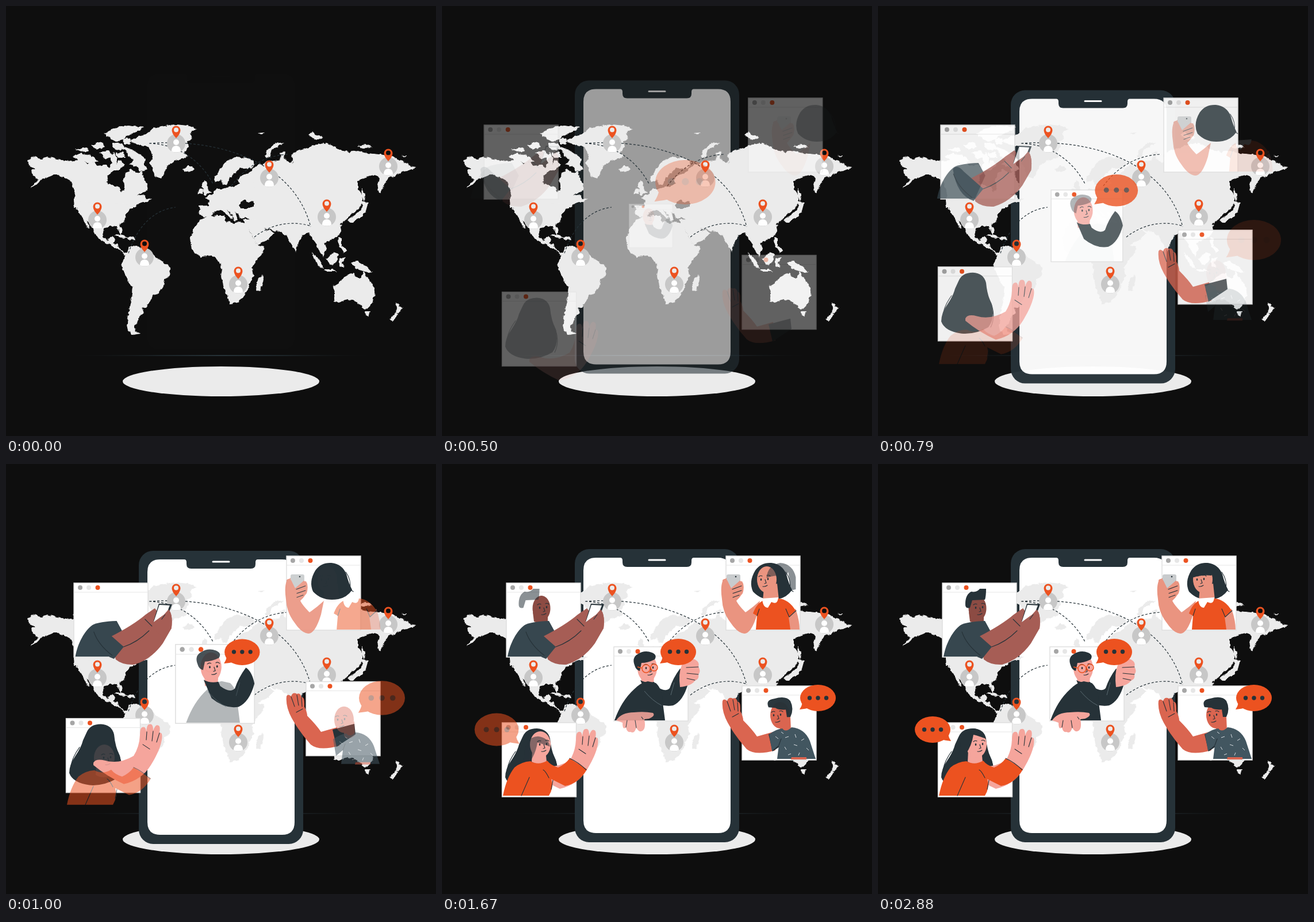
An HTML page that plays this animation: 748 by 748 pixels, repeating every 2.93 s.

```html
<!DOCTYPE html>
<html lang="en">
<head>
<meta charset="utf-8">
<title>Connected world</title>
<style>
html, body { margin: 0; width: 100%; height: 100%; overflow: hidden; background: #0e0e0e; }
svg { display: block; width: 100vw; height: 100vh; }
.white { fill: #fff; } .dark { fill: #263238; } .slate { fill: #37474f; } .accent { fill: #ec5220; }
.brown { fill: #a65d55; } .umber { fill: #8c4b43; } .peach { fill: #ea9480; } .pink { fill: #f5a59c; } .rust { fill: #da6550; }
.land { fill: #ebebeb; }
.ink { fill: none; stroke: #263238; stroke-width: 1.1; stroke-linecap: round; }
.dash { stroke-dasharray: 4 3; stroke-width: 1.2; stroke-linecap: butt; }
</style>
</head>
<body>
<svg viewBox="0 0 748 748">
<defs>
  <linearGradient id="taper">
    <stop offset="0" stop-color="#263238" stop-opacity="0"/>
    <stop offset=".3" stop-color="#263238"/>
    <stop offset=".7" stop-color="#263238"/>
    <stop offset="1" stop-color="#263238" stop-opacity="0"/>
  </linearGradient>
  <filter id="coast" x="0" y="0" width="748" height="748" filterUnits="userSpaceOnUse" color-interpolation-filters="sRGB">
    <feTurbulence type="fractalNoise" baseFrequency=".14" numOctaves="2" seed="4"/>
    <feDisplacementMap in="SourceGraphic" scale="6" xChannelSelector="R" yChannelSelector="G"/>
  </filter>
  <g id="pin">
    <circle r="16" fill="#c7c7c7"/>
    <circle class="white" cy="-2" r="5"/>
    <path class="white" d="M-8 14Q-8 4 0 4T8 14Q0 17-8 14Z"/>
    <path class="accent" fill-rule="evenodd" d="M0-9Q-7.5-17-7.5-23A7.5 7.5 0 0 1 7.5-23Q7.5-17 0-9ZM-4-23.500a4 4 0 0 0 8 0a4 4 0 0 0-8 0Z"/>
  </g>
  <g id="frame">
    <rect width="129" height="129" class="white" stroke="#dedede" stroke-width="1.4"/>
    <path d="M0 16H129" stroke="#e6e6e6"/>
    <circle cx="11" cy="8" r="4" fill="#a6a6a6"/>
    <circle cx="26" cy="8" r="4" fill="#e6e6e6"/>
    <circle cx="41.500" cy="8" r="4" class="accent"/>
  </g>
  <g id="face">
    <ellipse class="dark" cx="-6" rx="1.300" ry="2"/>
    <ellipse class="dark" cx="6" cy="-1" rx="1.300" ry="2"/>
    <path class="ink" d="M-10-5Q-7-8-4-6M4-7Q7-9 10-6M1 0L3 6L0 7M-3 12Q1 13 5 10"/>
  </g>
  <g id="dots" class="dark">
    <circle cx="-14.500" r="3.700"/><circle r="3.700"/><circle cx="14.500" r="3.700"/>
  </g>
  <g id="bubble" class="accent">
    <ellipse rx="31" ry="23"/>
    <path d="M-27 8Q-28 14-32 20Q-22 19-14 17Z"/>
  </g>
</defs>

<rect width="748" height="748" fill="#0e0e0e"/>
<path d="M95 608L374 607L652 608L374 609Z" fill="url(#taper)"/>
<ellipse class="land" cx="374" cy="653" rx="171" ry="26"/>

<g data-in="-47 1295 0 -45">
  <rect class="dark" x="231" y="148" width="286" height="510" rx="25"/>
  <path class="white" d="M268 163H310Q314 163 314 168V171Q314 179 322 179H426Q434 179 434 171V168Q434 163 438 163H480Q502 163 502 185V620Q502 642 480 642H268Q246 642 246 620V185Q246 163 268 163Z"/>
  <path d="M360 167H388" stroke="#fff" stroke-width="3" stroke-linecap="round"/>
</g>

<g class="land" filter="url(#coast)">
  <path d="M37 270L46 262 60 266 72 262 88 266 105 268 118 270 130 268 140 274 152 272 160 278 172 276 180 282 184 272 180 262 188 256 194 264 192 274 200 268 207 276 198 284 186 288 178 296 174 306 184 312 196 314 200 324 206 318 204 304 208 290 218 284 226 290 236 288 240 300 246 310 248 320 238 324 228 330 240 328 244 336 254 334 246 340 232 342 224 350 118 350 120 320 114 306 100 298 88 292 74 298 62 302 54 310 42 316 56 302 46 294 44 286 50 282 40 278Z"/>
  <path d="M118 340L230 345 214 356 208 364 206 374 198 380 202 392 200 398 192 384 180 382 170 388 168 400 176 408 186 400 190 406 186 412 194 414 198 424 206 430 212 428 208 434 198 426 186 418 174 412 160 404 154 394 144 376 140 372 146 388 140 384 132 366 122 352Z"/>
  <path d="M170 222L188 212 212 208 240 211 228 218 214 224 204 232 192 236 182 230ZM204 244L220 250 232 258 242 266 240 276 246 284 234 288 228 280 214 276 222 268 212 260ZM118 262L130 256 152 262 160 270 146 274 126 270ZM120 250L138 246 146 252 130 254ZM148 242L166 237 172 245 158 250ZM163 254L180 252 186 262 172 266ZM184 240L202 238 208 248 192 252ZM204 232L216 230 218 240 206 241ZM190 256L204 254 208 264 196 264Z"/>
  <path d="M215 235L232 226 246 222 256 212 276 208 296 206 316 208 330 214 320 222 324 228 316 236 318 246 310 254 316 262 304 266 292 270 282 278 276 288 270 300 260 296 254 284 250 272 256 264 252 252 246 244 232 242ZM307 283L314 279 324 279 328 284 318 290 310 288Z"/>
  <path d="M188 398L200 397 212 403 206 405ZM211 403L222 402 224 406 214 407Z"/>
  <path d="M200 452L204 440 210 430 214 418 222 416 232 420 246 422 254 430 262 438 272 444 287 456 284 468 276 476 274 488 266 500 254 504 250 516 242 526 236 524 240 534 232 540 230 548 224 556 226 564 232 570 222 572 212 566 211 550 214 530 218 508 220 488 210 474Z"/>
  <path d="M320 404L328 384 338 372 352 366 368 364 380 364 382 374 396 378 404 376 418 378 424 390 430 404 438 416 450 418 446 430 434 444 428 456 430 470 424 482 420 496 412 506 402 516 390 518 384 504 378 486 374 470 376 458 370 444 358 434 340 436 328 430 322 418ZM436 480L446 467 448 476 442 494 435 496Z"/>
  <path d="M362 300L372 284 384 270 400 262 418 264 432 270 430 282 416 284 406 280 400 290 390 298 384 310 378 312 374 303 364 307ZM344 324L340 314 344 304 351 308 350 316 357 324 345 329ZM333 325L338 317 343 321 341 327Z"/>
  <path fill-rule="evenodd" d="M337 362L336 348 352 347 353 338 346 333 358 328 366 318 376 318 394 314 406 310 402 302 412 294 430 286 440 274 470 290 470 392 440 385 426 374 418 368 408 370 404 362 398 358 404 372 398 374 390 362 384 355 394 364 392 371 380 358 372 354 362 358 356 366 346 368ZM406 346L414 337 422 342 430 338 432 348 422 352 408 352Z"/>
  <path d="M428 284L444 278 452 270 460 268 472 270 478 266 476 256 486 254 484 264 494 274 500 270 496 258 508 252 522 248 540 240 552 238 566 242 580 250 596 254 612 252 628 256 650 258 672 262 690 270 700 276 712 281 704 286 690 288 680 294 664 300 658 312 650 326 646 316 650 300 642 294 626 298 612 306 612 318 620 330 620 342 610 356 598 364 590 374 582 380 584 390 576 402 562 408 554 412 558 422 552 436 544 424 538 412 530 402 526 394 516 398 508 412 504 428 496 414 488 400 476 392 460 390 440 380Z"/>
  <path d="M412 371L440 372 450 388 466 394 458 406 438 416 432 408 424 390ZM450 262L456 248 468 240 484 238 474 244 462 250 458 264ZM438 221L450 220 444 224ZM526 224L534 218 538 224 552 228 540 233ZM612 243L626 241 638 245 620 248ZM689 261L697 260 696 263Z"/>
  <path d="M532 429L544 440 553 457 545 453 536 441ZM552 458L566 458 575 462 556 462ZM558 440L570 428 578 432 574 447 563 450ZM580 440L591 438 585 447 589 456 580 453ZM577 403L584 404 584 416 592 424 588 430 580 418ZM600 446L612 444 626 452 637 464 624 462 608 457ZM594 372L608 363 617 355 621 346 617 339 630 342 625 360 613 370 602 377ZM618 317L624 327 623 341 619 331Z"/>
  <path d="M568 488L578 482 588 474 596 466 604 464 608 472 616 474 622 462 628 472 640 488 642 504 636 518 626 528 618 522 608 514 594 510 578 516 570 514 572 500ZM625 531L633 531 630 539 626 537ZM678 516L690 526 683 534 680 532ZM666 545L680 532 683 537 672 547Z"/>
</g>

<path class="ink dash" d="M249 239C370 230 500 270 530 384M249 239C300 240 340 270 361 311M392 313Q430 262 490 258M432 402C460 380 495 372 531 383M213 430C228 385 255 355 295 350"/>
<g id="pins"></g>

<!-- upper left caller -->
<g data-in="-47 1295 -94 0"><g data-in="-47 1295">
  <use href="#frame" x="112" y="207"/>
  <g data-in="1000 650">
    <path class="umber" d="M158 258L184 260 184 274Q174 280 160 274Z"/>
    <ellipse class="umber" cx="173" cy="251" rx="15.500" ry="22"/>
    <use href="#face" x="176" y="250"/>
  </g>
  <path class="dark" data-in="1270 1000 -40 0" d="M152 246Q151 228 162 222Q172 224 177 217L188 217Q188 230 186 236L164 237 160 250Q153 252 152 246Z"/>
  <path class="slate" data-in="300 1000 -30 0" d="M114 335C118 312 130 290 144 280Q156 274 186 273L198 295 180 335Z"/>
  <g data-in="100 1295 -60 0">
    <path class="brown" d="M176 300Q215 280 236 262L252 251Q260 260 264 270L281 286Q284 262 276 253L281 286 266 312Q246 340 216 349Q196 350 184 340Z"/>
    <path class="slate" d="M145 284Q152 274 164 288L198 318 181 339Q152 330 145 284Z"/>
    <path class="dark" d="M259 243L282 244 268 283 248 280Z"/>
    <path class="white" d="M260 245L278 246 265 280 249 278Z"/>
    <path class="brown" d="M245 285Q232 280 233 272Q242 266 248 264L250 275 268 262 276 253Q284 262 281 286L266 300Z"/>
    <path class="ink" d="M146 292Q154 315 178 333M198 318Q222 310 242 290M235 270L247 282M264 270L270 262"/>
  </g>
</g></g>

<!-- upper right caller -->
<g data-in="-47 1295 94 0"><g data-in="-47 1295">
  <use href="#frame" x="494" y="160"/>
  <g data-in="100 1295 60 0">
    <path class="dark" d="M541 222Q533 205 545 185Q555 171 573 172Q592 174 599 192Q603 208 609 219Q600 232 585 235Q558 240 541 222Z"/>
    <path class="ink" d="M598 188Q608 202 605 218L611 222"/>
  </g>
  <g data-in="950 700">
    <path class="peach" d="M560 215L583 208 586 236Q572 248 558 238Z"/>
    <ellipse class="peach" cx="565" cy="201" rx="17" ry="23"/>
    <use href="#face" x="561" y="201"/>
  </g>
  <path class="dark" data-in="1270 1000 40 0" d="M546 198Q548 176 570 172Q592 174 597 197L597 218 588 220 584 188 580 194Q564 192 546 198Z"/>
  <g data-in="200 1350 60 0">
    <path class="peach" d="M488 204Q484 215 487 235Q488 258 502 276Q514 294 526 295Q538 295 548 262L553 238Q540 250 528 258Q516 246 512 238L523 225Q527 212 522 204L500 212 495 198Z"/>
    <rect x="495" y="192" width="24" height="30" rx="3" fill="#c8cbcd"/>
    <circle class="dark" cx="511" cy="196" r="1.300"/>
    <path class="peach" d="M488 202Q494 196 498 206L503 216 518 203Q526 206 523 213Q526 220 521 226Q516 238 505 240L488 226Z"/>
    <path class="ink" d="M505 218L521 212M506 225L521 220M506 232L517 228"/>
  </g>
  <g data-in="600 1050 70 0">
    <path class="peach" d="M600 262L615 252Q622 272 622 288L601 288Z"/>
    <path class="accent" d="M546 288L548 264 541 260Q548 240 563 236L586 234Q604 236 615 255L603 266 606 288Z"/>
    <path class="white" d="M557 234Q558 250 567 250L573 240Q584 246 585 232Z"/>
    <path class="ink" d="M598 252L604 266 616 255M548 264L552 252"/>
  </g>
</g></g>

<!-- lower left caller -->
<g data-in="-47 1295 0 115"><g data-in="-47 1295">
  <use href="#frame" x="104.500" y="450"/>
  <g data-in="100 1295">
    <path class="dark" d="M140 475Q146 460 165 460Q184 461 188 478Q190 500 198 515Q204 540 192 555Q170 568 145 566Q116 562 110 545Q110 530 121 515Q131 500 134 488Z"/>
    <path class="ink" d="M128 500Q106 530 116 552M190 500Q208 530 196 555"/>
  </g>
  <g data-in="100 1295 0 60">
    <path class="pink" d="M152 528Q156 520 172 524Q196 531 222 516Q232 500 233 480Q233 466 238 466Q243 464 244 474Q245 460 250 461Q256 459 256 472Q260 460 265 463Q269 464 267 476Q273 474 271 488Q268 506 252 532Q236 558 205 565Q176 552 152 532Z"/>
    <path class="ink" d="M245 474L244 488M256 473L254 490M267 476L262 492M238 496L250 504"/>
  </g>
  <g data-in="850 800 0 35">
    <path class="pink" d="M157 498L180 498 182 518Q170 526 156 518Z"/>
    <ellipse class="pink" cx="171" cy="488" rx="18" ry="23"/>
    <use href="#face" x="176" y="488"/>
  </g>
  <path class="dark" data-in="1270 1000 0 30" d="M143 494Q144 461 167 460Q185 462 188 478Q172 472 166 471Q163 490 153 504L155 516 134 530Z"/>
  <g data-in="560 1100 0 50">
    <path class="accent" d="M106 577Q112 546 126 528Q138 518 154 517Q168 525 183 516Q189 524 202 528Q215 522 222 512L252 531Q238 556 214 560L190 548Q195 562 186 577Z"/>
    <path class="ink" d="M138 577L152 545M186 546Q180 534 176 532M193 550L190 566M222 512Q236 518 251 532"/>
  </g>
</g></g>

<!-- lower right caller -->
<g data-in="-47 1295 0 115"><g data-in="-47 1295">
  <use href="#frame" x="522" y="386"/>
  <g data-in="100 1295 0 55">
    <path class="rust" d="M488 412Q490 407 496 412Q499 404 506 408Q512 405 514 414Q520 412 519 430Q524 440 524 446Q540 462 548 474L576 466 580 498Q545 508 530 496Q510 474 497 450Q486 430 488 412Z"/>
    <path class="ink" d="M496 413L502 430M506 410L509 428M514 415L515 430M505 440L516 434"/>
    <path class="dark" d="M568 470L606 460 608 478 575 500Z"/>
  </g>
  <g data-in="700 900 0 25">
    <path class="rust" d="M588 448L606 440 607 464Q596 474 588 466Z"/>
    <ellipse class="rust" cx="588" cy="437" rx="17" ry="23"/>
    <use href="#face" x="583" y="437"/>
  </g>
  <path class="dark" data-in="1150 800 0 8" d="M568 423Q562 410 578 408Q598 402 606 412Q613 426 606 440L600 440 598 427Q586 428 580 424Z"/>
  <g data-in="560 1100 0 35">
    <path fill="#425660" d="M569 470Q582 461 592 460Q598 468 608 458Q631 460 640 482L650 513 583 513 586 489 574 499Z"/>
    <path d="M580 474l5 4M597 476l6-2M614 470l2 6M630 478l-5 3M596 492l3 5M612 488l6 2M634 494l4 4M602 506l5-2M622 502l-2 5M590 466l4 3" stroke="#d5dade" fill="none"/>
    <path class="ink" d="M586 489L590 478"/>
    <path class="rust" d="M608 510H634V514H607Z"/>
  </g>
</g></g>

<!-- middle caller -->
<g data-in="-47 1295 0 0 0 363 382"><g data-in="-47 1295">
  <use href="#frame" x="299" y="318"/>
  <g data-in="100 1295">
    <path class="pink" d="M346 365L369 366 368 385 347 386Z"/>
    <ellipse class="pink" cx="357" cy="355" rx="17" ry="24"/>
    <use href="#face" x="361" y="355"/>
    <path class="dark" d="M345 376Q356 382 369 379L372 386Q388 398 396 390Q402 372 414 356Q424 362 428 382Q420 412 402 420Q380 424 358 406Z"/>
  </g>
  <path class="dark" data-in="500 900" d="M335 350Q330 337 340 331Q352 323 365 328Q375 332 370 340Q358 346 347 346L344 360Q337 358 335 350Z"/>
  <path class="dark" data-in="720 900 25 0" d="M300 446Q312 412 334 392Q346 380 358 378L372 381Q384 392 384 415L388 446Z"/>
  <path data-in="560 1100" d="M352 395Q366 412 382 420M404 380L398 402" fill="none" stroke="#596970"/>
  <g data-in="900 750" fill="none" stroke="#ec5220" stroke-width="1.500">
    <circle cx="355" cy="356" r="7"/><circle cx="369" cy="354" r="6"/><path d="M340 353L348 355"/>
  </g>
  <g data-in="1050 900">
    <path class="pink" d="M414 388Q411 364 417 350Q428 336 440 340Q449 345 446 353Q451 360 446 366Q448 374 440 377Q434 386 414 388Z"/>
    <path class="ink" d="M425 354L446 353M426 364L446 366M426 373L440 376"/>
  </g>
  <g data-in="1150 900">
    <path class="pink" d="M303 446Q312 432 334 432Q352 430 367 433Q372 438 360 443L352 444Q355 460 349 464Q342 468 338 458Q335 470 328 466Q322 468 320 458Q314 464 314 450Z"/>
    <path class="ink" d="M320 458L322 446M338 459L336 446M350 444L347 440"/>
  </g>
</g></g>

<g data-in="128 1260 0 0 2 393 357">
  <use href="#bubble" x="411" y="327"/><g data-in="128 1260"><use href="#dots" x="411" y="326.500"/></g>
</g>
<g data-in="585 1065 0 0 1.6 654 407">
  <use href="#bubble" x="654" y="407"/><g data-in="585 1065"><use href="#dots" x="654" y="407"/></g>
</g>
<g data-in="1250 1065 0 0 1.5 95 462">
  <use href="#bubble" transform="matrix(-1 0 0 1 95 462)"/><g data-in="1250 1065"><use href="#dots" x="95" y="462"/></g>
</g>
</svg>

<script>
const LOOP = 2930;
const pinSpots = [[159, 372], [241, 437], [296, 239], [404, 484], [458, 299], [558, 367], [665, 279]];
document.getElementById('pins').innerHTML =
  pinSpots.map(([x, y]) => `<use href="#pin" x="${x}" y="${y}"/>`).join('');

// Entrance values: start, duration, offset x, offset y, first scale, scale centre x, scale centre y.
const entrances = [...document.querySelectorAll('[data-in]')].map(node => {
  const [start, duration, dx = 0, dy = 0, scale = 1, cx = 0, cy = 0] = node.dataset.in.split(' ').map(Number);
  return { node, start, duration, dx, dy, scale, cx, cy };
});

const bezier = (a, b, s) => 3 * (1 - s) ** 2 * s * a + 3 * (1 - s) * s * s * b + s ** 3;

// Cubic Bezier (.36, -.01, .5, 1.38): a soft start and a slight overshoot.
function ease(x) {
  if (x <= 0) return 0;
  if (x >= 1) return 1;
  let low = 0, high = 1;
  for (let i = 0; i < 20; i++) {
    const mid = (low + high) / 2;
    if (bezier(.36, .5, mid) < x) low = mid; else high = mid;
  }
  return bezier(-.01, 1.38, low);
}

function draw(time) {
  for (const { node, start, duration, dx, dy, scale, cx, cy } of entrances) {
    const progress = ease((time - start) / duration);
    const rest = 1 - progress;
    const size = Math.max(0, 1 + (scale - 1) * rest);
    node.setAttribute('opacity', Math.min(1, Math.max(0, progress)));
    node.setAttribute('transform',
      `translate(${dx * rest + cx * (1 - size)} ${dy * rest + cy * (1 - size)}) scale(${size})`);
  }
}

const began = performance.now();
function tick() {
  draw((performance.now() - began) % LOOP);
  requestAnimationFrame(tick);
}
tick();
</script>
</body>
</html>
```
